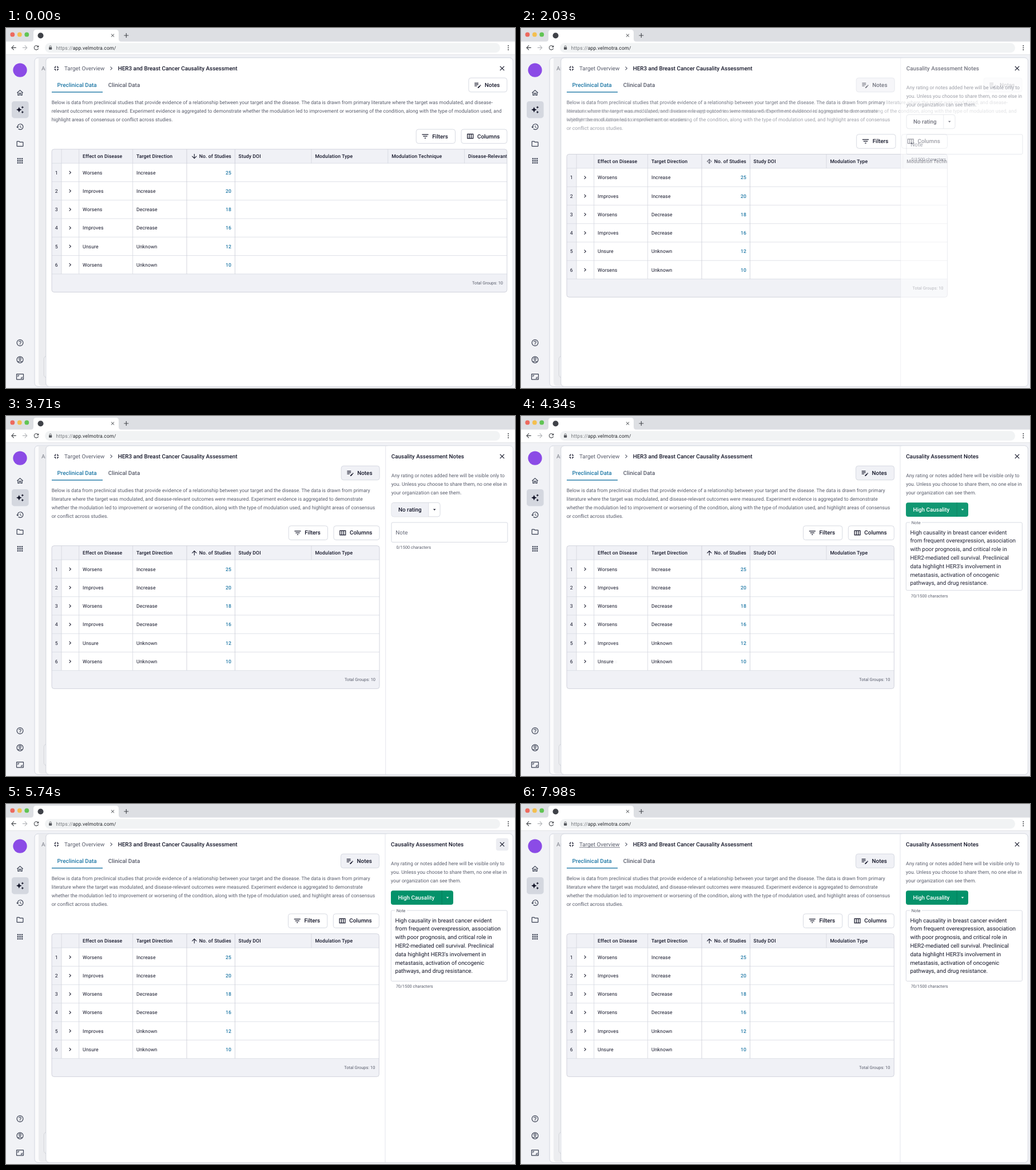
These frames come from a looping animation (890x629 px, 8 s). An HTML page:

```html
<!DOCTYPE html>
<html lang="en">
<head>
<meta charset="utf-8">
<title>Causality assessment notes</title>
<style>
  html, body { margin: 0; width: 100%; height: 100%; overflow: hidden; background: #f1f2f6; }
  svg { display: block; width: 100%; height: 100%; }
  text { font-family: Roboto, "Liberation Sans", sans-serif; text-rendering: geometricPrecision; white-space: pre; }
</style>
</head>
<body>
<svg id="stage" viewBox="0 0 890 629"></svg>
<script>
const LOOP = 8000;
const INK = '#15172a', SOFT = '#585c6b', BLUE = '#1f78a6', LINE = '#d3d6df', HEAD = '#f0f1f6', GREEN = '#04926a';
const SMALL = 7.416, BODY = 8.653, LARGE = 9.889;

const ICONS = {
  home: 'M12 5.69l5 4.5V18h-2v-6H9v6H7v-7.81l5-4.5M12 3L2 12h3v8h6v-6h2v6h6v-8h3z',
  spark: 'M19 9l1.25-2.75L23 5l-2.75-1.25L19 1l-1.25 2.75L15 5l2.75 1.25zM11.5 9.5L9 4 6.5 9.5 1 12l5.5 2.5L9 20l2.5-5.5L17 12zM19 15l-1.25 2.75L15 19l2.75 1.25L19 23l1.25-2.75L23 19l-2.75-1.25z',
  history: 'M13 3a9 9 0 0 0-9 9H1l3.9 4L9 12H6a7 7 0 1 1 2.06 4.94l-1.42 1.42A9 9 0 1 0 13 3zm-1 5v5l4.28 2.54.72-1.21-3.5-2.08V8z',
  folder: 'M9.17 6l2 2H20v10H4V6h5.17M10 4H4a2 2 0 0 0-2 2v12a2 2 0 0 0 2 2h16a2 2 0 0 0 2-2V8a2 2 0 0 0-2-2h-8z',
  apps: [4, 10, 16].flatMap(x => [4, 10, 16].map(y => `M${x} ${y}h4v4h-4z`)).join(''),
  help: 'M11 18h2v-2h-2zm1-16a10 10 0 1 0 0 20 10 10 0 0 0 0-20zm0 18a8 8 0 1 1 0-16 8 8 0 0 1 0 16zm0-14a4 4 0 0 0-4 4h2a2 2 0 0 1 4 0c0 2-3 1.75-3 5h2c0-2.25 3-2.5 3-5a4 4 0 0 0-4-4z',
  screen: 'M19 12h-2v3h-3v2h5zM7 9h3V7H5v5h2zm14-6H3a2 2 0 0 0-2 2v14a2 2 0 0 0 2 2h18a2 2 0 0 0 2-2V5a2 2 0 0 0-2-2zm0 16H3V5h18z',
  shrink: 'M5 16h3v3h2v-5H5zm3-8H5v2h5V5H8zm6 11h2v-3h3v-2h-5zm2-11V5h-2v5h5V8z',
  chevron: 'M10 6L8.59 7.41 13.17 12l-4.58 4.59L10 18l6-6z',
  close: 'M19 6.41L17.59 5 12 10.59 6.41 5 5 6.41 10.59 12 5 17.59 6.41 19 12 13.41 17.59 19 19 17.59 13.41 12z',
  note: 'M3 10h11v2H3zm0-2h11V6H3zm0 8h7v-2H3zm15-3.13.71-.71a1 1 0 0 1 1.41 0l.71.71a1 1 0 0 1 0 1.41l-.71.71zm-.7.71-5.3 5.3V21h2.12l5.3-5.3z',
  filter: 'M10 18h4v-2h-4zM3 6v2h18V6zm3 7h12v-2H6z',
  columns: 'M3 5v14h18V5zm5.33 12H5V7h3.33zm5.34 0h-3.33V7h3.33zM19 17h-3.33V7H19z',
  arrow: 'M20 12l-1.41-1.41L13 16.17V4h-2v12.17l-5.58-5.59L4 12l8 8z',
  caret: 'M7 10l5 5 5-5z',
  reload: 'M17.65 6.35A8 8 0 1 0 19.73 14h-2.08A6 6 0 1 1 12 6c1.66 0 3.14.69 4.22 1.78L13 11h7V4z',
  plus: 'M19 13h-6v6h-2v-6H5v-2h6V5h2v6h6z'
};

const icon = (name, x, y, scale = .618, fill = INK, turn = 0) =>
  `<path d="${ICONS[name]}" fill="${fill}" fill-rule="evenodd" transform="translate(${x} ${y}) rotate(${turn}) scale(${scale}) translate(-12 -12)"/>`;

// Text is placed by the vertical centre of its capitals.
const text = (x, y, str, { size = BODY, fill = INK, w = 400, anchor = 'start', ls = 0, id = '' } = {}) =>
  `<text ${id && `id="${id}"`} x="${x}" y="${y + size * .355}" font-size="${size}" font-weight="${w}" fill="${fill}" text-anchor="${anchor}" letter-spacing="${ls}">${str}</text>`;

const lines = (x, y, rows, opt) => rows.map((s, i) => text(x, y + i * 14.83, s, opt)).join('');
const rect = (x, y, w, h, fill, extra = '') => `<rect x="${x}" y="${y}" width="${w}" height="${h}" fill="${fill}" ${extra}/>`;
const line = (x1, y1, x2, y2, color = LINE, w = .8) => `<path d="M${x1} ${y1}L${x2} ${y2}" stroke="${color}" stroke-width="${w}"/>`;
const group = (id, body, extra = '') => `<g id="${id}" ${extra}>${body}</g>`;
const strong = { size: LARGE, w: 500 };
const outline = `rx="4" stroke="${LINE}" stroke-width=".9"`;

const button = (x, y, w, name, label, fill = '#fff', id = '') =>
  rect(x, y, w, 24.6, fill, `${outline} ${id && `id="${id}"`}`) +
  icon(name, x + 15.8, y + 12.2) + text(x + 28, y + 12, label, strong);

function browser() {
  const lights = ['#ed6a5e', '#f4bf4f', '#61c554'];
  return rect(0, 0, 890, 24, '#dddfe3') +
    lights.map((c, i) => `<circle cx="${11.3 + i * 12.5}" cy="11.4" r="3.9" fill="${c}"/>`).join('') +
    '<path d="M43 24q5 0 5-5V8q0-5 5-5H192q5 0 5 5V19q0 5 5 5z" fill="#fff"/>' +
    rect(0, 23.7, 890, 22.8, '#fff') + line(0, 46.6, 890, 46.6, '#dcdee3') +
    '<circle cx="60.5" cy="13.2" r="5" fill="#3f4248"/>' +
    icon('close', 186.5, 13, .4, '#45484d') + icon('plus', 210.3, 13, .57, '#45484d') +
    icon('arrow', 13.4, 34.4, .54, '#45484d', 90) + icon('arrow', 33.2, 34.4, .54, '#b4b6ba', -90) +
    icon('reload', 53, 34.4, .53, '#45484d') +
    rect(68, 26.3, 796, 16.8, '#f1f3f4', 'rx="8.4"') +
    rect(75, 33.4, 5.2, 4.3, '#55585d', 'rx=".7"') +
    '<path d="M76.1 33.6v-1.2a1.5 1.5 0 0 1 3 0v1.2" fill="none" stroke="#55585d" stroke-width=".8"/>' +
    text(87.5, 34.8, 'https://<tspan fill="#222429">app.velmotra.com/</tspan>', { fill: '#74777c', ls: .15 }) +
    [31, 34.5, 38].map(y => `<circle cx="878.3" cy="${y}" r="1.05" fill="#45484d"/>`).join('');
}

function sidebar() {
  const tone = '#3a4052';
  const column = [['home', 113.3], ['history', 172.6], ['folder', 202.4], ['apps', 232], ['help', 550], ['screen', 609.4]];
  return '<circle cx="24.5" cy="73.6" r="12.2" fill="#8b4be6"/>' +
    rect(10, 128, 29.6, 29.4, '#d4d7df', 'rx="4.5"') + icon('spark', 24.6, 142.8, .6) +
    column.map(([n, y]) => icon(n, 24.5, y, .6, tone)).join('') +
    `<g fill="none" stroke="${tone}" stroke-width="1.2"><circle cx="24.5" cy="579.6" r="5.5"/><circle cx="24.5" cy="578" r="1.8"/><path d="M20.8 583.4q3.7-3 7.4 0"/></g>`;
}

function page() {
  return rect(50, 52, 836.4, 574.4, '#fbfbfc', `rx="6" stroke="${LINE}"`) +
    '<path d="M57 52.5H80V625H63q-6 0-6-6z" fill="#ecedf0"/>' +
    text(62, 70.3, 'As', { size: LARGE, fill: '#7b7e88' }) +
    rect(66.5, 573, 30, 38, '#f3f4f6', 'rx="5" stroke="#cfd1d7"') +
    rect(69, 52, 817.4, 574.6, '#20263c', 'rx="6" opacity=".06"') +
    rect(69.8, 52, 816.6, 574.4, '#fff', `rx="6" stroke="${LINE}" stroke-width=".9"`) +
    icon('shrink', 88.2, 70.5, .56) +
    text(102, 70.3, 'Target Overview', { size: LARGE, fill: SOFT }) +
    group('underline', line(102, 75.8, 173, 75.8, SOFT)) +
    icon('chevron', 184, 70.5, .56, SOFT) +
    text(195.7, 70.3, 'HER3 and Breast Cancer Causality Assessment', strong) +
    text(89.5, 99.4, 'Preclinical Data', { ...strong, fill: BLUE }) +
    text(178.8, 99.4, 'Clinical Data', { ...strong, fill: SOFT }) +
    rect(80, 111.3, 89, 1.4, BLUE);
}

function description() {
  const opt = { fill: SOFT };
  return group('wide', lines(79.7, 130.2, [
    'Below is data from preclinical studies that provide evidence of a relationship between your target and the disease. The data is drawn from primary literature where the target was modulated, and disease-',
    'relevant outcomes were measured. Experiment evidence is aggregated to demonstrate whether the modulation led to improvement or worsening of the condition, along with the type of modulation used, and',
    'highlight areas of consensus or conflict across studies.'], opt)) +
  group('slim', lines(79.7, 130.2, [
    'Below is data from preclinical studies that provide evidence of a relationship between your target and the disease. The data is drawn from primary',
    'literature where the target was modulated, and disease-relevant outcomes were measured. Experiment evidence is aggregated to demonstrate',
    'whether the modulation led to improvement or worsening of the condition, along with the type of modulation used, and highlight areas of consensus',
    'or conflict across studies.'], opt));
}

function table() {
  const top = 211.8, first = 236.3, pitch = 32.25, foot = first + pitch * 6;
  const before = ['Worsens', 'Improves', 'Worsens', 'Improves', 'Unsure', 'Worsens'];
  const after = ['Worsens', 'Improves', 'Worsens', 'Worsens', 'Improves', 'Unsure'];
  const trend = ['Increase', 'Increase', 'Decrease', 'Decrease', 'Unknown', 'Unknown'];
  const count = [25, 20, 18, 16, 12, 10];
  const heads = [[134, 'Effect on Disease'], [228, 'Target Direction'], [337.7, 'No. of Studies'], [406.6, 'Study DOI'],
    [540.4, 'Modulation Type'], [674.2, 'Modulation Technique'], [808, 'Disease-Relevant Outcome']];
  const cell = { ls: .1 };
  const effects = (list, keep) => list.map((s, i) =>
    (before[i] === after[i]) === keep ? text(134, 252.6 + i * pitch, s, cell) : '').join('');

  let out = rect(80, top, 800, 250, HEAD) + rect(97, first, 783, foot - first, '#fff');
  for (let i = 0; i < 7; i++) out += line(80, first + i * pitch, 880, first + i * pitch, '#d9dbe2');
  [97, 127.6, 221.6, 316, 400.4].forEach(x => out += line(x, top, x, foot, x > 300 ? '#c9ccd6' : LINE));
  [534, 667.8, 801.6].forEach(x => out += line(x, top, x, first));
  heads.forEach(([x, s]) => out += text(x, 224.3, s, { w: 500, ls: .1 }));
  out += group('down', icon('arrow', 329.3, 224.3, .54)) + group('up', icon('arrow', 329.3, 224.3, .54, INK, 180));
  count.forEach((n, i) => {
    const y = 252.6 + i * pitch;
    out += text(88.2, y, i + 1, { anchor: 'middle' }) + icon('chevron', 112, y, .5) +
      text(228, y, trend[i], cell) + text(394, y, n, { w: 500, fill: BLUE, anchor: 'end', ls: .1 });
  });
  out += effects(before, true) + group('rowsOld', effects(before, false)) + group('rowsNew', effects(after, false));
  out += text(0, 445.8, 'Total Groups: 10', { size: SMALL, fill: SOFT, anchor: 'end', id: 'total' });
  const frame = (id, extra) => `<rect id="${id}" x="80" y="${top}" height="249.7" rx="4" ${extra}/>`;
  return `<clipPath id="clip">${frame('clipBox', '')}</clipPath>` +
    group('grid', `<g clip-path="url(#clip)">${out}</g>` + frame('border', `fill="none" stroke="#cdd0da" stroke-width=".9"`));
}

function panel() {
  const label = { size: LARGE, fill: '#666a78' }, tiny = { size: SMALL, fill: SOFT };
  const old = rect(674, 151.4, 85, 24.5, '#fff', outline) +
    group('rateHover', '<path d="M738.5 151.9H678q-3.5 0-3.5 3.5V172q0 3.5 3.5 3.5h60.5z" fill="#f0f1f6"/>') +
    line(738.8, 151.4, 738.8, 175.9) + text(686, 163.4, 'No rating', strong) + icon('caret', 749.2, 163.5, .46);
  const rated = rect(673.7, 151.2, 109, 24.9, GREEN, 'rx="4"') + line(762.8, 151.2, 762.8, 176.1, '#067a59') +
    text(686.1, 163.4, 'High Causality', { ...strong, fill: '#fff' }) + icon('caret', 772.7, 163.5, .46, '#fff');
  return rect(663.7, 52.5, 222.2, 573.4, '#fff', 'rx="5"') + line(663.7, 52.5, 663.7, 626, '#dcdee6') +
    text(673.8, 70.3, 'Causality Assessment Notes', strong) +
    lines(673.8, 104.2, ['Any rating or notes added here will be visible only to',
      'you. Unless you choose to share them, no one else in', 'your organization can see them.'], { fill: SOFT }) +
    group('rateOld', old) + group('rateNew', rated) +
    rect(674, 186, 203, 34.5, '#fff', `rx="2" id="box" stroke="${LINE}" stroke-width=".9"`) +
    group('hint', text(681.3, 203, 'Note', label)) +
    group('filled', rect(680.5, 184.5, 21, 3, '#fff') + text(683.4, 186.4, 'Note', tiny) + lines(681.1, 203, [
      'High causality in breast cancer evident', 'from frequent overexpression, association', 'with poor prognosis, and critical role in',
      'HER2-mediated cell survival. Preclinical', "data highlight HER3's involvement in", 'metastasis, activation of oncogenic',
      'pathways, and drug resistance.'], { size: LARGE })) +
    group('counter', group('countOld', text(682.4, 229.8, '0/1500 characters', tiny)) +
      group('countNew', text(682.4, 229.8, '70/1500 characters', tiny)));
}

document.getElementById('stage').innerHTML =
  rect(0, 0, 890, 629, '#f1f2f6') + browser() + sidebar() + page() + description() +
  group('notesOld', button(809, 87.2, 67, 'note', 'Notes', '#fff', 'notesFill')) +
  group('notesNew', button(586.2, 87.2, 67, 'note', 'Notes', HEAD)) +
  group('tools', button(717.2, 177, 68.3, 'filter', 'Filters') + button(796, 177, 80, 'columns', 'Columns')) +
  table() + group('panel', panel()) +
  group('closeHover', rect(856.8, 59.8, 21.8, 21.6, '#ecedf2', 'rx="4"')) + icon('close', 867.5, 70.5, .58);

const el = {};
document.querySelectorAll('[id]').forEach(n => el[n.id] = n);
const set = (id, name, value) => el[id].setAttribute(name, value);
const show = (id, a) => set(id, 'opacity', a);
const move = (id, x, y) => set(id, 'transform', `translate(${x} ${y})`);
const fade = (t, a, b) => Math.min(1, Math.max(0, (t - a) / (b - a)));
const swap = (from, to, p) => { show(from, 1 - p); show(to, p); };

// Critically damped spring from 0 to 1.
function spring(t, start) {
  const k = (t - start) * .0205;
  return k <= 0 ? 0 : k > 11 ? 1 : 1 - (1 + k) * Math.exp(-k);
}

function render(t) {
  const open = spring(t, 1935), rate = spring(t, 4115);
  const dx = -223 * open - .7 * rate, dy = 14.9 * open, grow = 89 * rate;

  const tint = fade(t, 1100, 1300);
  set('notesFill', 'fill', `rgb(${255 - 15 * tint},${255 - 14 * tint},${255 - 9 * tint})`);
  swap('notesOld', 'notesNew', open);
  swap('wide', 'slim', open);
  swap('down', 'up', open);
  show('panel', open);
  move('panel', -.7 * rate, 0);
  move('notesNew', -.7 * rate, 0);
  move('tools', dx, dy);
  move('grid', 0, dy);
  set('clipBox', 'width', 796 + dx);
  set('border', 'width', 796 + dx);
  set('total', 'x', 869 + dx);

  show('rateHover', fade(t, 2760, 2940));
  swap('rateOld', 'rateNew', rate);
  swap('rowsOld', 'rowsNew', rate);
  swap('hint', 'filled', rate);
  swap('countOld', 'countNew', rate);
  set('box', 'height', 34.5 + grow);
  move('counter', 0, grow);

  show('closeHover', fade(t, 5560, 5740) - fade(t, 6540, 6660));
  show('underline', fade(t, 6890, 7070));
}

function tick(now) {
  render(now % LOOP);
  requestAnimationFrame(tick);
}
render(0);
requestAnimationFrame(tick);
</script>
</body>
</html>
```
